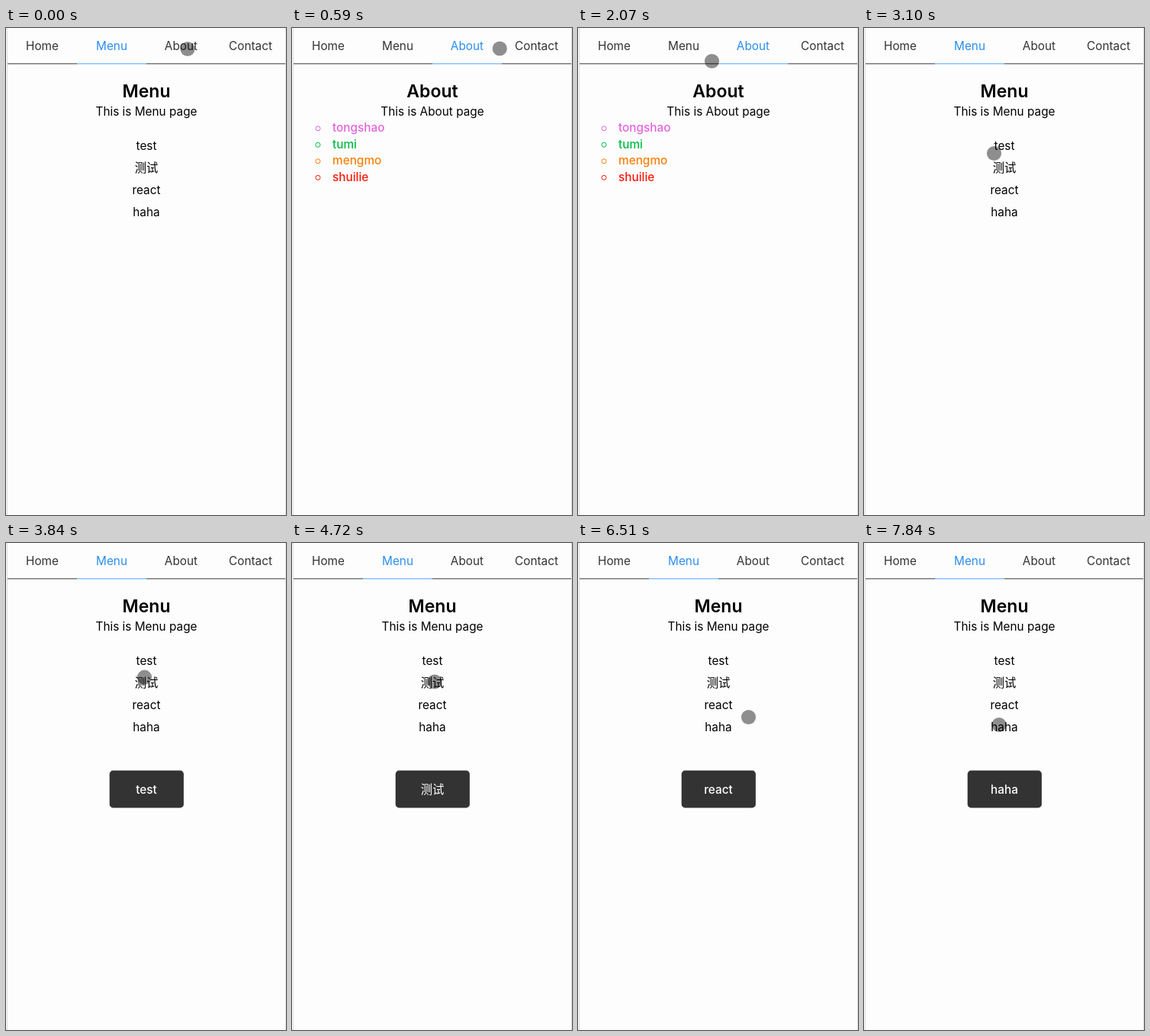
An HTML page for the animation above (7990 ms loop, 367 px wide and 639 px high).

```html
<!DOCTYPE html>
<html lang="en">
<head>
<meta charset="utf-8">
<title>Tab navigation</title>
<style>
  html, body { margin: 0; width: 100%; height: 100%; overflow: hidden; background: #fdfdfd; }
  svg { display: block; width: 367px; height: 639px; }
  text { font: 400 15.35px Inter, "Noto Sans CJK SC", "Noto Sans CJK", sans-serif; }
  .mid { text-anchor: middle; }
  .title { font-size: 23px; font-weight: 600; }
  .strong { font-weight: 500; }
</style>
</head>
<body>
<svg id="stage" viewBox="0 0 367 639"></svg>
<script>
const LOOP = 7990;
const TICKS = 54; // the screen refreshes this often per loop
const CENTER = 184;
const TAB_WIDTH = 91;
const TABS = ['Home', 'Menu', 'About', 'Contact'];
const ITEMS = ['test', '测试', 'react', 'haha'];
const PEOPLE = { tongshao: '#e364de', tumi: '#00bd43', mengmo: '#fb7f0c', shuilie: '#fb1a0c' };

// What is tapped, and at which tick
const TAPS = [
  { tick: 0, name: 'Menu' }, { tick: 2, name: 'About' },
  { tick: 7, name: 'Contact' }, { tick: 11, name: 'About' },
  { tick: 17, name: 'Menu' }, { tick: 23, name: 'test' },
  { tick: 29, name: '测试' }, { tick: 35, name: 'react' },
  { tick: 53, name: 'haha' }
];

// The cursor rests between these straight moves
const REST = { x: 238, y: 27.5 };
const MOVES = [
  { from: 3, to: 5, x: 306.5, y: 26.5 },
  { from: 7, to: 10, x: 234, y: 28 },
  { from: 12, to: 14, x: 175.5, y: 43.5 },
  { from: 14, to: 16, x: 141, y: 42 },
  { from: 18, to: 21, x: 170.5, y: 164.5 },
  { from: 24, to: 27, x: 187, y: 182 },
  { from: 31, to: 33, x: 186, y: 212 },
  { from: 39, to: 42, x: 266, y: 201.5 },
  { from: 43, to: 44, x: 223.5, y: 228.5 },
  { from: 44, to: 46, x: 137, y: 261 },
  { from: 46, to: 49, x: 177, y: 238.5 }
];

const stage = document.getElementById('stage');

function add(parent, tag, attrs, content = '') {
  const node = document.createElementNS('http://www.w3.org/2000/svg', tag);
  for (const name in attrs) node.setAttribute(name, attrs[name]);
  node.textContent = content;
  parent.append(node);
  return node;
}

function label(parent, content, x, y, className = 'mid', fill = '#000') {
  return add(parent, 'text', { x, y, class: className, fill }, content);
}

function box(parent, x, y, width, height, fill, rx = 0) {
  return add(parent, 'rect', { x, y, width, height, fill, rx });
}

function show(node, visible) {
  node.setAttribute('display', visible ? 'inline' : 'none');
}

function lastTapped(names, tick) {
  return TAPS.findLast(tap => tap.tick <= tick && names.includes(tap.name))?.name ?? '';
}

function cursorAt(tick) {
  let { x, y } = REST;
  for (const move of MOVES) {
    const progress = Math.min(1, Math.max(0, (tick - move.from) / (move.to - move.from)));
    x += (move.x - x) * progress;
    y += (move.y - y) * progress;
  }
  return { x, y };
}

box(stage, 1, 0, 1, 639, '#dcdcdc');
box(stage, 366, 0, 1, 639, '#dcdcdc');

const tabs = TABS.map((name, i) => {
  const x = 2 + i * TAB_WIDTH;
  return {
    name,
    text: label(stage, name, x + TAB_WIDTH / 2, 29),
    line: box(stage, x, 46, TAB_WIDTH, 1.6, '#808080')
  };
});

const pages = {};
for (const name of TABS.slice(1)) {
  const page = pages[name] = add(stage, 'g', {});
  label(page, name, CENTER, 91, 'mid title');
  label(page, `This is ${name} page`, CENTER, 115.3);
}

ITEMS.forEach((item, i) => label(pages.Menu, item, CENTER, 160 + i * 29.1));

Object.entries(PEOPLE).forEach(([name, color], i) => {
  const y = 136.3 + i * 21.5;
  add(pages.About, 'circle', { cx: 34, cy: y - 4.5, r: 3, fill: 'none', stroke: color });
  label(pages.About, name, 53, y, 'strong', color);
});

const toast = add(stage, 'g', {});
box(toast, 135.7, 298.6, 97.2, 48.8, '#333', 4.5);
const toastText = label(toast, '', CENTER, 329, 'mid strong', '#fff');

const cursor = add(stage, 'circle', { r: 9.6, fill: '#000', 'fill-opacity': 0.44 });

function render(time) {
  // A small lead keeps rounding from delaying a refresh
  const tick = Math.min(TICKS - 1, Math.floor((time + 10) / LOOP * TICKS));

  const current = lastTapped(TABS, tick);
  for (const { name, text, line } of tabs) {
    const active = name === current;
    text.setAttribute('fill', active ? '#2a8ef0' : '#333');
    line.setAttribute('fill', active ? '#8fc6fb' : '#808080');
  }
  for (const name in pages) show(pages[name], name === current);

  const message = lastTapped(ITEMS, tick);
  show(toast, message);
  toastText.textContent = message;

  const { x, y } = cursorAt(tick);
  cursor.setAttribute('cx', x);
  cursor.setAttribute('cy', y);
}

const start = performance.now();
function frame() {
  render((performance.now() - start) % LOOP);
  requestAnimationFrame(frame);
}
frame();
</script>
</body>
</html>
```
